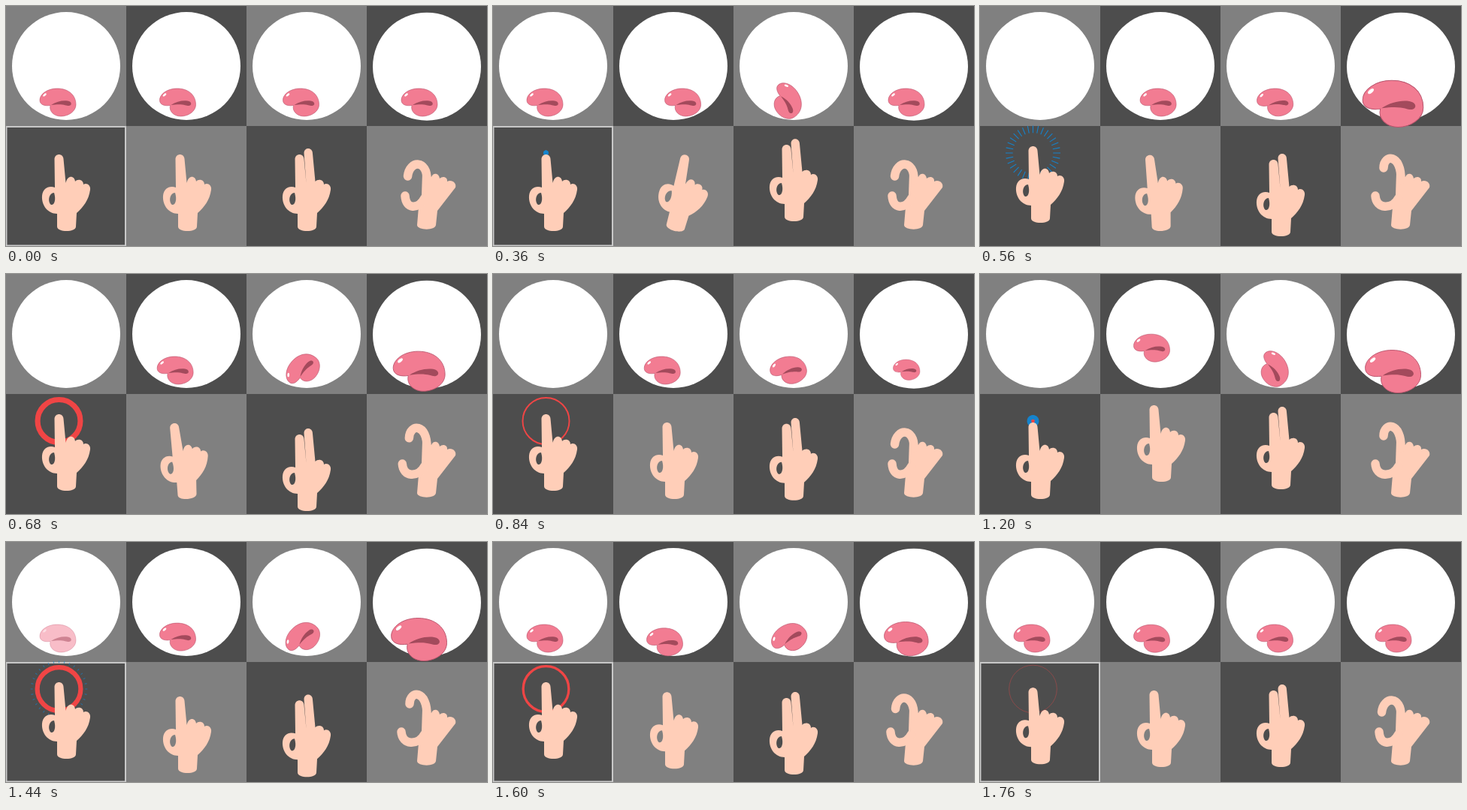
Write an HTML page with a canvas that moves like this. It is 640x320 px and loops after 1800 ms.

```html
<!DOCTYPE html>
<html>
<head>
<meta charset="utf-8">
<style>
  html, body { margin: 0; overflow: hidden; }
  canvas { display: block; }
</style>
</head>
<body>
<canvas id="stage" width="640" height="320"></canvas>
<script>
const ctx = document.getElementById('stage').getContext('2d');
const LOOP = 1800, STEP = 40, HOLD = 120, CYCLE = 830;
const DARK = '#4d4d4d', LIGHT = '#808080', SKIN = '#ffceb8', BLUE = '#1583cc', RED = '#f04545';

// Lips are drawn around their pivot, hands in the coordinates of a 160 px cell
const LIPS = new Path2D('M-24 -3C-24 -11 -14 -18.5 -1 -18.5C14 -18.5 24 -10 24 3C24 12 14 18.5 4 18.5C-5 18.5 -12 12 -10 4C-16 5 -24 4 -24 -3Z');
const MOUTH = new Path2D('M-9 3.5C-2 -1 6 -3 13 -2C19 -1 19 4 15 4.5C11 5 8 1 -9 3.5Z');
const INDEX = 'M68 134L68 117C56 117 47 106 48 93C49 83 57 79 65 82L64.5 44C65 36 76 36 76.5 44L79.5 76';
const PALM = 'C95 70 103 71 103 78C107 75 113 79 112 85C110 99 103 108 94 116L93 134C93 142 68 142 68 134Z' +
  'M64 89C57 89 55 101 60 105C64 106 67 99 64 89Z';
const POINT = new Path2D(INDEX + 'C82 65 91 66 92 74' + PALM);
const PAIR = new Path2D(INDEX + 'L76.5 36C77 28 88 28 88 37L91.5 74' + PALM);
const FIST = new Path2D('M74 62L86 68C88 62 96 62 97 70C101 66 108 68 107 74C113 71 120 76 118 82L94 113L92 132C91 140 67 139 67 132L69 108L73 92Z');

const ease = (t, from, to) => {
  const k = Math.min(1, Math.max(0, (t - from) / (to - from)));
  return k * k * (3 - 2 * k);
};
// Rises to 1 between a and b, falls back to 0 between c and d
const pulse = (t, a, b, c, d) => ease(t, a, b) - ease(t, c, d);

function disc(x, y, radius, color) {
  ctx.fillStyle = color;
  ctx.beginPath();
  ctx.arc(x, y, radius, 0, 7);
  ctx.fill();
}

function at(x, y, degrees, scale, paint) {
  ctx.save();
  ctx.translate(x, y);
  ctx.rotate(degrees * Math.PI / 180);
  ctx.scale(scale, scale);
  paint();
  ctx.restore();
}

function lips(x, y, { angle = 0, scale = 1, alpha = 1 } = {}) {
  at(x, y, angle, scale, () => {
    ctx.translate(-0.8, 2.8);
    ctx.globalAlpha = alpha;
    ctx.fillStyle = '#f27c92';
    ctx.fill(LIPS);
    ctx.strokeStyle = '#b9536c';
    ctx.lineWidth = 0.6;
    ctx.stroke(LIPS);
    ctx.fillStyle = '#a34a5c';
    ctx.fill(MOUTH);
    ctx.fillStyle = '#fff';
    ctx.beginPath();
    ctx.ellipse(-17.5, -10, 2.8, 1.4, -0.7, 0, 7);
    ctx.fill();
  });
}

function hand(path, x, y, angle = 0) {
  at(x + 81, y + 300, angle, 1, () => {
    ctx.translate(-81, -140);
    ctx.fillStyle = SKIN;
    ctx.fill(path, 'evenodd');
  });
}

function pinchHand(x, spread) {
  hand(FIST, x, 0);
  at(x, 160, 0, 1, () => {
    ctx.strokeStyle = SKIN;
    ctx.lineCap = 'round';
    ctx.lineWidth = 11.5;
    const top = 45 - 8 * spread, thumb = 51 - 5 * spread;
    ctx.beginPath();
    ctx.moveTo(54.5 + 2.5 * spread, 67 - 11 * spread);
    ctx.bezierCurveTo(57, top, 81, top, 80, 72);
    ctx.moveTo(thumb, 93);
    ctx.bezierCurveTo(thumb + 1, 111, 68, 112, 77, 96);
    ctx.stroke();
  });
}

function background(selected) {
  for (let i = 0; i < 4; i++) {
    ctx.fillStyle = i % 2 ? DARK : LIGHT;
    ctx.fillRect(i * 160, 0, 160, 160);
    ctx.fillStyle = i % 2 ? LIGHT : DARK;
    ctx.fillRect(i * 160, 160, 160, 160);
    disc(i * 160 + 80, i === 3 ? 80.7 : 80, 72, '#fff');
  }
  if (selected) {
    ctx.strokeStyle = '#c8c8c8';
    ctx.lineWidth = 2;
    ctx.strokeRect(0.5, 161, 158.5, 158.5);
  }
}

function burst(p) {
  const age = p - 233;
  if (age <= 0) return;
  const outer = 39 * (1 - Math.exp(-age / 75));
  const inner = outer * ease(p, 245, 540);
  at(70.5, 196, 0, 1, () => {
    ctx.globalAlpha = 1 - ease(p, 430, 570);
    ctx.strokeStyle = BLUE;
    ctx.lineWidth = 2.4 - 1.3 * ease(p, 260, 440);
    ctx.beginPath();
    for (let i = 0; i < 32; i++) {
      ctx.rotate(Math.PI / 16);
      ctx.moveTo(inner, 0);
      ctx.lineTo(outer, 0);
    }
    ctx.stroke();
  });
}

function ripple(t, start, duration) {
  const k = (t - start) / duration;
  if (k <= 0 || k >= 1) return;
  const outer = 32 * ease(k, 0, 0.2);
  ctx.strokeStyle = RED;
  ctx.lineWidth = Math.min(11 * (1 - k), outer);
  ctx.beginPath();
  ctx.arc(70.5, 196, outer - ctx.lineWidth / 2, 0, 7);
  ctx.stroke();
}

function draw(t) {
  const p = (t - HOLD) % CYCLE;
  const sideways = t < HOLD + CYCLE ? 1 : 0, upward = 1 - sideways;

  const press = -11 * pulse(p, 280, 400, 780, CYCLE);
  const drag = 26 * pulse(p, 40, 280, 280, 540) - 4 * pulse(p, 440, 600, 680, CYCLE);
  const swipe = pulse(p, 40, 230, 260, 430) - 0.35 * pulse(p, 360, 490, 520, 720);
  const turn = 60 * pulse(p, 40, 240, 260, 430) - 48 * pulse(p, 430, 505, 560, 790);
  const scroll = 16 * pulse(p, 360, 535, 570, 760) - 13 * pulse(p, 40, 250, 260, 440);
  const firstPinch = pulse(t, 370, 520, 620, 800);
  const secondPinch = pulse(t, 1000, 1170, 1460, 1710);
  const zoom = 1 + 0.68 * firstPinch - 0.26 * pulse(t, 620, 800, 1000, 1170) + 0.54 * secondPinch;

  background(t < 400 || t >= 1360);
  lips(69.8, 125.7, { alpha: 1 - pulse(t, 360, 540, 1360, 1520) });
  lips(229.3 + sideways * drag, 125.7 - 1.2 * upward * drag);
  lips(393.3, 125.7, { angle: turn });
  lips(550.8, 125.7, { scale: zoom });

  burst(p);
  ripple(t, 560, 340);
  ripple(t, 1180, 600);
  hand(POINT, 0, press);
  hand(POINT, 161, -23 * upward * swipe, 14 * sideways * swipe);
  hand(PAIR, 320, scroll);
  pinchHand(480, firstPinch + secondPinch);
}

function frame(now) {
  const t = Math.floor(now % LOOP / STEP) * STEP;
  draw(Math.max(t, HOLD - STEP));
  requestAnimationFrame(frame);
}
requestAnimationFrame(frame);
</script>
</body>
</html>
```
